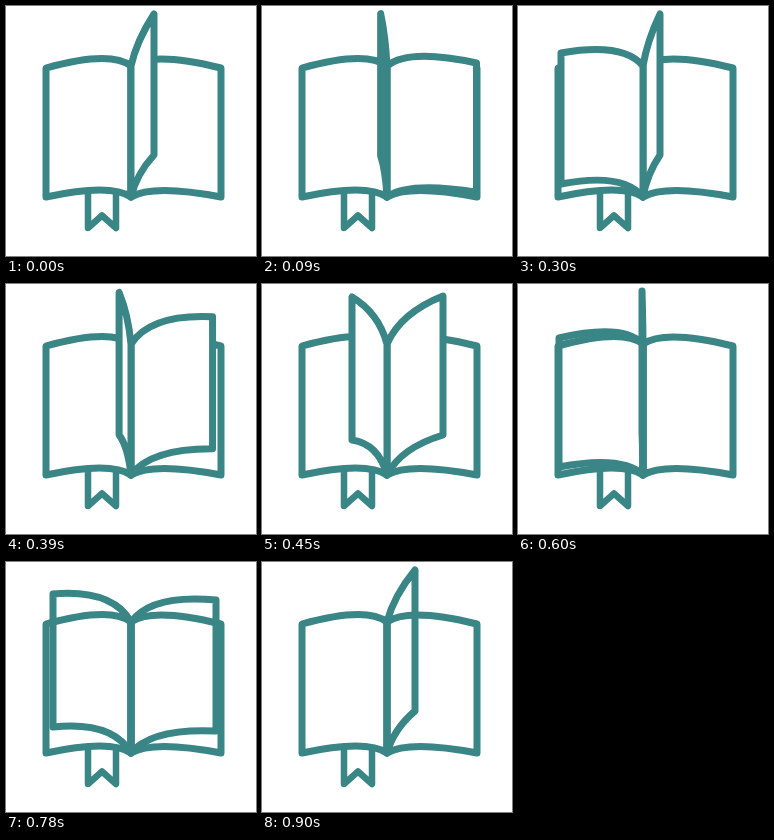
These frames come from a looping animation (250x250 px, 0.93 s). An HTML page with a canvas:

```html
<!DOCTYPE html>
<html lang="en">
<head>
<meta charset="utf-8">
<title>Book with turning pages</title>
<style>
  html, body { margin: 0; width: 100%; height: 100%; overflow: hidden; background: #fff; }
  canvas { display: block; }
</style>
</head>
<body>
<canvas id="stage" width="250" height="250"></canvas>
<script>
const ctx = document.getElementById('stage').getContext('2d');
const LOOP = 930, STEP = 30;
const SPINE = 125, SPINE_TOP = 60, SPINE_BOTTOM = 191;
const PAGE_STARTS = [525, 285, 0]; // back to front
const OPAQUE_UNTIL = 570;

// time, outer edge x, top y, bottom y, top curve y, bottom curve y
const POSES = [
  [-220, 215, 62, 191, 45, 178],
  [-150, 210, 38, 169, 32, 166],
  [-105, 196, 22, 157, 27, 163],
  [-75, 181, 12, 151, 29, 164],
  [-30, 153, 8, 149, 34, 167],
  [0, 148, 8, 149, 35, 168],
  [15, 142, 8, 149, 35, 168],
  [75, 124, 7, 149, 31, 165],
  [165, 90, 13, 156, 29, 160],
  [180, 84, 15, 157, 28, 160],
  [255, 47, 32, 165, 27, 159],
  [300, 43, 47, 178, 36, 166],
  [315, 41, 54, 183, 39, 171],
  [360, 40, 62, 191, 44, 177]
];
const RIGHT = POSES[0].slice(1);
const LEFT = POSES[POSES.length - 1].slice(1);

function slope(i, k) {
  const a = POSES[i - 1], b = POSES[i + 1];
  return a && b ? (b[k] - a[k]) / (b[0] - a[0]) : 0;
}

// Cubic Hermite interpolation between neighbouring poses
function poseAt(time) {
  const i = POSES.findIndex(p => p[0] > time) - 1;
  if (i < 0) return null;
  const a = POSES[i], b = POSES[i + 1], span = b[0] - a[0];
  const u = (time - a[0]) / span, v = 1 - u;
  return [1, 2, 3, 4, 5].map(k =>
    v * v * (1 + 2 * u) * a[k] + u * u * (3 - 2 * u) * b[k] +
    span * u * v * (v * slope(i, k) - u * slope(i + 1, k)));
}

function drawPage([x, top, bottom, topCurve, bottomCurve], opaque) {
  const bend = SPINE + (x - SPINE) * 0.24;
  ctx.beginPath();
  ctx.moveTo(SPINE, SPINE_TOP);
  ctx.quadraticCurveTo(bend, topCurve, x, top);
  ctx.lineTo(x, bottom);
  ctx.quadraticCurveTo(bend, bottomCurve, SPINE, SPINE_BOTTOM);
  ctx.closePath();
  if (opaque) ctx.fill();
  ctx.stroke();
}

function drawBookmark() {
  ctx.beginPath();
  ctx.moveTo(82, 187);
  ctx.lineTo(82, 222);
  ctx.lineTo(96, 209.5);
  ctx.lineTo(110, 222);
  ctx.lineTo(110, 187);
  ctx.stroke();
}

function draw(now) {
  const time = Math.floor(now % LOOP / STEP) * STEP;
  ctx.fillStyle = '#fff';
  ctx.fillRect(0, 0, 250, 250);
  ctx.strokeStyle = '#3a8585';
  ctx.lineJoin = ctx.lineCap = 'round';
  ctx.lineWidth = 6.5;
  drawBookmark();
  ctx.lineWidth = 7;
  drawPage(LEFT);
  drawPage(RIGHT);
  const first = POSES[0][0];
  for (const start of PAGE_STARTS) {
    const pose = poseAt((time - start - first + LOOP) % LOOP + first);
    if (pose) drawPage(pose, time < OPAQUE_UNTIL);
  }
}

const begin = performance.now();
function tick() {
  draw(performance.now() - begin);
  requestAnimationFrame(tick);
}
tick();
</script>
</body>
</html>
```
